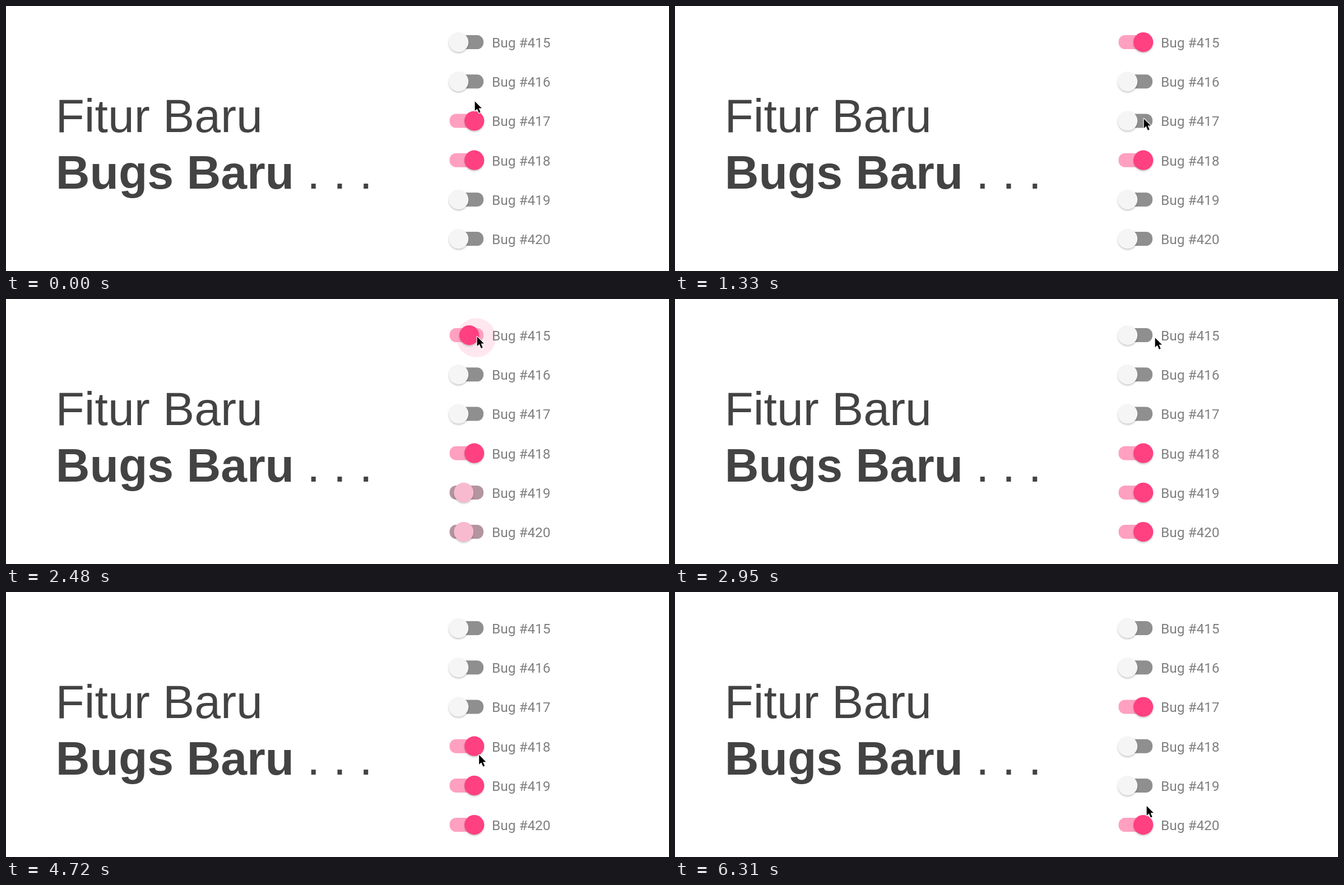
Animation of 1183 by 473 pixels, one loop 6460 ms. Source, as an HTML page:

```html
<!DOCTYPE html>
<html lang="id">
<head>
<meta charset="utf-8">
<title>Bugs Baru</title>
<style>
html, body { margin: 0; width: 100%; height: 100%; overflow: hidden; background: #fff; }
svg { display: block; width: 100vw; height: 100vh; }
.title { font: 84.1px "Liberation Sans", Arial, sans-serif; fill: #434343; }
.bold { font-weight: 700; }
.label { font: 24.4px Roboto, sans-serif; fill: #808080; }
.thumb { filter: drop-shadow(0 2px 1.5px rgba(0, 0, 0, .22)); }
</style>
</head>
<body>
<svg viewBox="0 0 1183 473" xmlns="http://www.w3.org/2000/svg">
  <rect width="1183" height="473" fill="#fff"/>
  <text class="title" x="88.5" y="224.5">Fitur Baru</text>
  <text class="title bold" x="88.8" y="325.5">Bugs Baru</text>
  <text class="title" x="537" y="325.5">. . .</text>
  <circle id="ripple" fill="#ff4081"/>
  <g id="rows"></g>
  <path id="cursor" d="M0 0V17L4 13.3L7.2 20.6L10 19.4L6.9 12.3H12.2Z"
    fill="#000" stroke="#fff" stroke-width="2.4" stroke-linejoin="round" paint-order="stroke"/>
</svg>
<script>
const LOOP = 6460, FRAME = 1000 / 15, REST = 120;
const ROWS = 6, TOP = 64.6, GAP = 70.2;
const GREY = [143, 143, 143], ROSE = [255, 160, 192];
const WHITE = [245, 245, 245], PINK = [255, 64, 129];

// every click flips the pressed switch and those that react to it
const clicks = [
  { at: 880, row: 2, also: [0] },
  { at: 2300, row: 0, also: [4, 5] },
  { at: 5250, row: 3, also: [] },
  { at: 5850, row: 4, also: [2] }
];

// arrival time and place; the pointer rests briefly at each stop
const stops = [
  [0, 836, 169], [660, 913, 399], [880, 836, 200], [1340, 836, 200],
  [2050, 855, 187], [2270, 839, 66], [2880, 856, 68], [3540, 838, 249],
  [3940, 894, 380], [4260, 826, 277], [4700, 844, 290], [4920, 856, 386],
  [5240, 855, 278], [5690, 844, 345], [6290, 841, 381]
];

const $ = id => document.getElementById(id);
const clamp = v => Math.min(1, Math.max(0, v));
const mix = (a, b, p) => a + (b - a) * p;
const ease = p => (1 - Math.cos(Math.PI * clamp(p))) / 2;
const blend = (a, b, p) => `rgb(${a.map((v, i) => Math.round(mix(v, b[i], p)))})`;

function set(node, attrs) {
  for (const key in attrs) node.setAttribute(key, attrs[key]);
  return node;
}

function add(tag, attrs) {
  const node = document.createElementNS("http://www.w3.org/2000/svg", tag);
  return $("rows").appendChild(set(node, attrs));
}

const rows = Array.from({ length: ROWS }, (_, i) => {
  const y = TOP + GAP * i;
  const track = add("rect", { x: 791.5, y: y - 12.5, width: 60.5, height: 25, rx: 11.5 });
  const thumb = add("circle", { class: "thumb", cy: y, r: 17.6 });
  add("text", { class: "label", x: 867, y: y + 9.4 }).textContent = "Bug #" + (415 + i);
  return { track, thumb };
});

// the colour of a pressed switch changes a little after its thumb moves
function switchState(row, t) {
  let pos = row === 2 || row === 3 ? 1 : 0, tint = pos, goal = pos;
  for (const click of clicks) {
    const pressed = click.row === row;
    if (!pressed && !click.also.includes(row)) continue;
    goal = 1 - goal;
    const since = t - click.at - 70;
    pos = mix(pos, goal, ease(since / 250));
    tint = mix(tint, goal, ease((since - (pressed ? 100 : 0)) / 250));
  }
  return { pos, tint };
}

function pointer(t) {
  const next = stops.findIndex(stop => stop[0] > t);
  if (next < 0) return stops.at(-1).slice(1);
  const [start, x, y] = stops[next - 1], [end, x2, y2] = stops[next];
  const p = ease((t - start - REST) / (end - start - REST));
  return [mix(x, x2, p), mix(y, y2, p)];
}

function drawRipple(t) {
  const click = clicks.findLast(c => t >= c.at);
  const since = click ? t - click.at : LOOP;
  const [x, y] = pointer(click ? click.at : 0);
  set($("ripple"), {
    cx: x, cy: y + 3,
    r: mix(12, 35, ease(since / 130)),
    opacity: 0.125 * clamp((400 - since) / 150)
  });
}

function render(ms) {
  const t = Math.floor((ms % LOOP + 10) / FRAME) * FRAME;
  rows.forEach(({ track, thumb }, i) => {
    const { pos, tint } = switchState(i, t);
    set(track, { fill: blend(GREY, ROSE, tint) });
    set(thumb, { fill: blend(WHITE, PINK, tint), cx: mix(807.6, 835.6, pos) });
  });
  drawRipple(t);
  const [x, y] = pointer(t);
  set($("cursor"), { transform: `translate(${x + 0.6} ${y + 1.2})` });
}

let begin;
function tick(now) {
  begin ??= now;
  render(now - begin);
  requestAnimationFrame(tick);
}
render(0);
requestAnimationFrame(tick);
</script>
</body>
</html>
```
